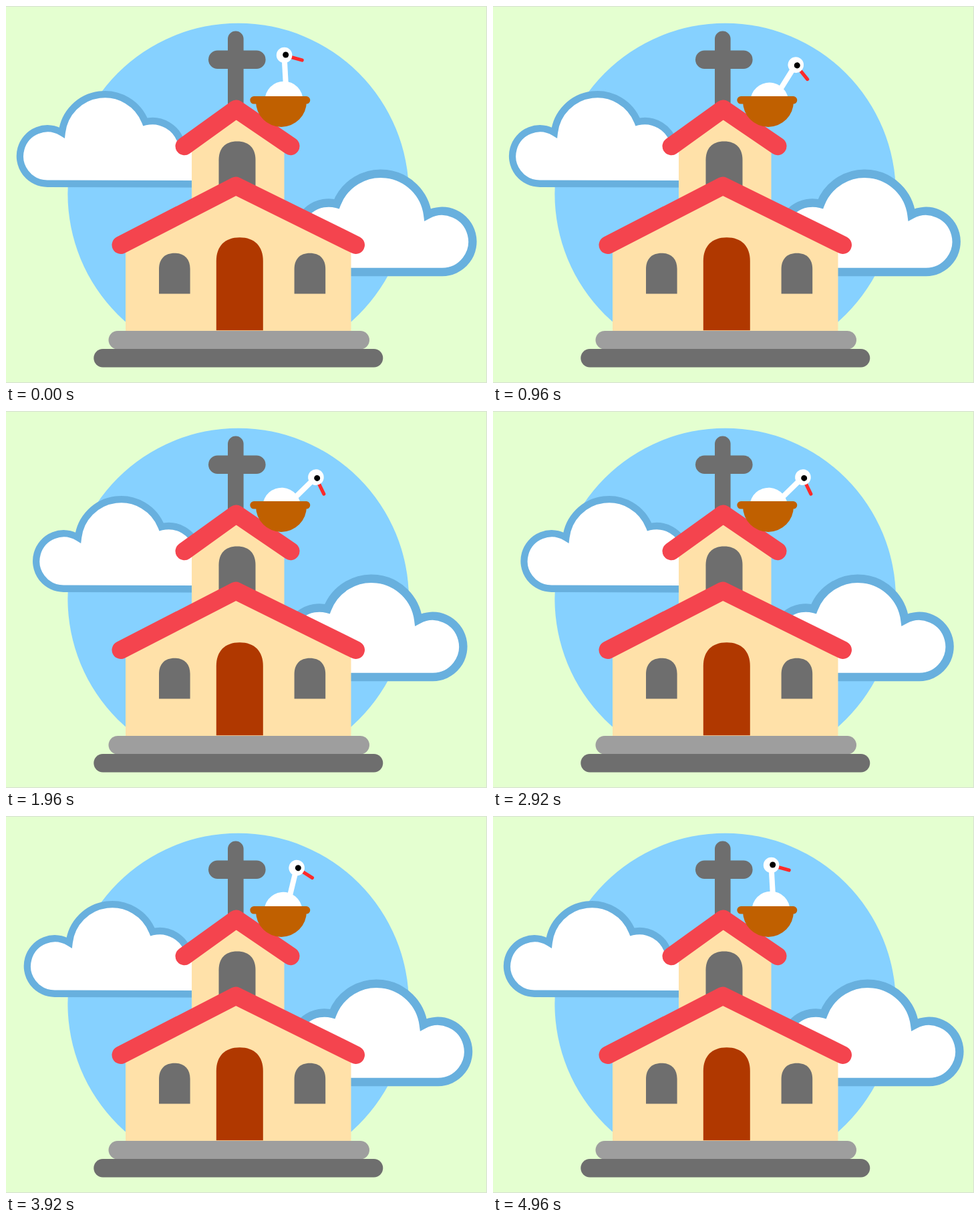
Animation of 720x564 px, one loop 5.04 s. Source, as an HTML page:

```html
<!DOCTYPE html>
<html lang="en">
<head>
<meta charset="utf-8">
<title>Church with stork</title>
<style>
  html, body { margin: 0; width: 100%; height: 100%; overflow: hidden; background: #e4ffd0; }
  svg { display: block; width: 100vw; height: 100vh; }
  .cloud { fill: #fff; stroke: #68b0de; stroke-miterlimit: 6; }
  .roof { fill: none; stroke: #f4444e; stroke-width: 27; stroke-linecap: round; stroke-linejoin: round; }
  .wall { fill: #ffe1a9; }
  .grey { fill: #6e6e6e; }
  .nest { fill: #c06000; }
</style>
</head>
<body>
<svg viewBox="0 0 720 564">
  <rect width="720" height="564" fill="#e4ffd0"/>
  <path d="M0 .5H719.5V563.5H0" fill="none" stroke="#d6dfd2"/>
  <circle cx="347.7" cy="281" r="255.3" fill="#86d1ff"/>

  <path id="leftCloud" class="cloud" stroke-width="10.4"
    d="M330 266.5L62 265.7A41.2 41.2 0 1 1 83.7 189.4A64.8 64.8 0 0 1 208.4 173.3A45 45 0 0 1 262.4 205L330 215Z"/>
  <path id="rightCloud" class="cloud" stroke-width="12.5"
    d="M480 398H653A45.6 45.6 0 1 0 631.2 312.2A70.8 70.8 0 0 0 495 296A46.7 46.7 0 0 0 436.3 341Z"/>

  <g class="grey">
    <rect x="332" y="37.5" width="23.6" height="125" rx="11.8"/>
    <rect x="303" y="66.5" width="85.6" height="27.5" rx="13.7"/>
  </g>

  <path class="wall" d="M278 201L344.5 154L416.5 204V310H278Z"/>
  <path class="grey" d="M318.5 280V230.5C318.5 213 328 202.5 346 202.5S373.5 213 373.5 230.5V280Z"/>
  <path class="roof" d="M267 209.7L344.5 154L426 209.7"/>

  <path class="wall" d="M179 354L344 269L516.5 354V487H179Z"/>
  <path class="roof" d="M172 357.5L344 269L523.5 357.5"/>

  <path id="window" class="grey" d="M229 430.5V393.5C229 378.5 237.5 369.7 252.3 369.7S275.6 378.5 275.6 393.5V430.5Z"/>
  <use href="#window" x="202.6"/>
  <path fill="#b03800" d="M314.8 485.3V381.5C314.8 359.5 327.5 346.3 349.8 346.3S384.8 359.5 384.8 381.5V485.3Z"/>

  <rect x="153.5" y="486" width="390.5" height="27.5" rx="13.7" fill="#9e9e9e"/>
  <rect class="grey" x="131.3" y="513" width="433" height="27.5" rx="13.7"/>

  <g id="bird">
    <circle cx="416" cy="141.2" r="28.5" fill="#fff"/>
    <path d="M419.3 125L416.5 75" stroke="#fff" stroke-width="8"/>
    <path d="M425 76L443.2 81" stroke="#ff2a2a" stroke-width="5.2" stroke-linecap="round"/>
    <circle cx="416.6" cy="73.5" r="11.8" fill="#fff"/>
    <circle cx="418.7" cy="73" r="4.5"/>
  </g>
  <path class="nest" d="M374 143A38 38 0 0 0 450 143Z"/>
  <rect class="nest" x="365.3" y="135" width="90" height="11.6" rx="5.8"/>
</svg>
<script>
  const LOOP = 5040, STEP = 40, CYCLE = 5000;
  const byId = id => document.getElementById(id);
  const leftCloud = byId('leftCloud'), rightCloud = byId('rightCloud'), bird = byId('bird');

  // cubic-bezier(.42, 0, .58, 1)
  function easeInOut(x) {
    if (x <= 0) return 0;
    if (x >= 1) return 1;
    let lo = 0, hi = 1, s = x;
    for (let i = 0; i < 24; i++) {
      s = (lo + hi) / 2;
      const bx = 3 * s * (1 - s) * (.42 * (1 - s) + .58 * s) + s ** 3;
      if (bx < x) lo = s; else hi = s;
    }
    return s * s * (3 - 2 * s);
  }

  // Goes 0 to 1 from time 0, then back from time `back`.
  const swing = (t, back, duration) =>
    easeInOut(t / duration) - easeInOut((t - back) / duration);

  function render(ms) {
    const tick = Math.min(Math.floor((ms % LOOP) / STEP) * STEP, LOOP - 2 * STEP);
    const t = tick * CYCLE / LOOP;
    const drift = swing(t, 2500, 2500);
    const lean = swing(t, 3000, 1500);
    leftCloud.setAttribute('transform', `translate(${27 * drift} 0)`);
    rightCloud.setAttribute('transform', `translate(${-15.6 * drift} 0)`);
    bird.setAttribute('transform', `rotate(${48.8 * lean} 412 138.5)`);
  }

  let start;
  function frame(now) {
    start ??= now;
    render(now - start);
    requestAnimationFrame(frame);
  }
  render(0);
  requestAnimationFrame(frame);
</script>
</body>
</html>
```
